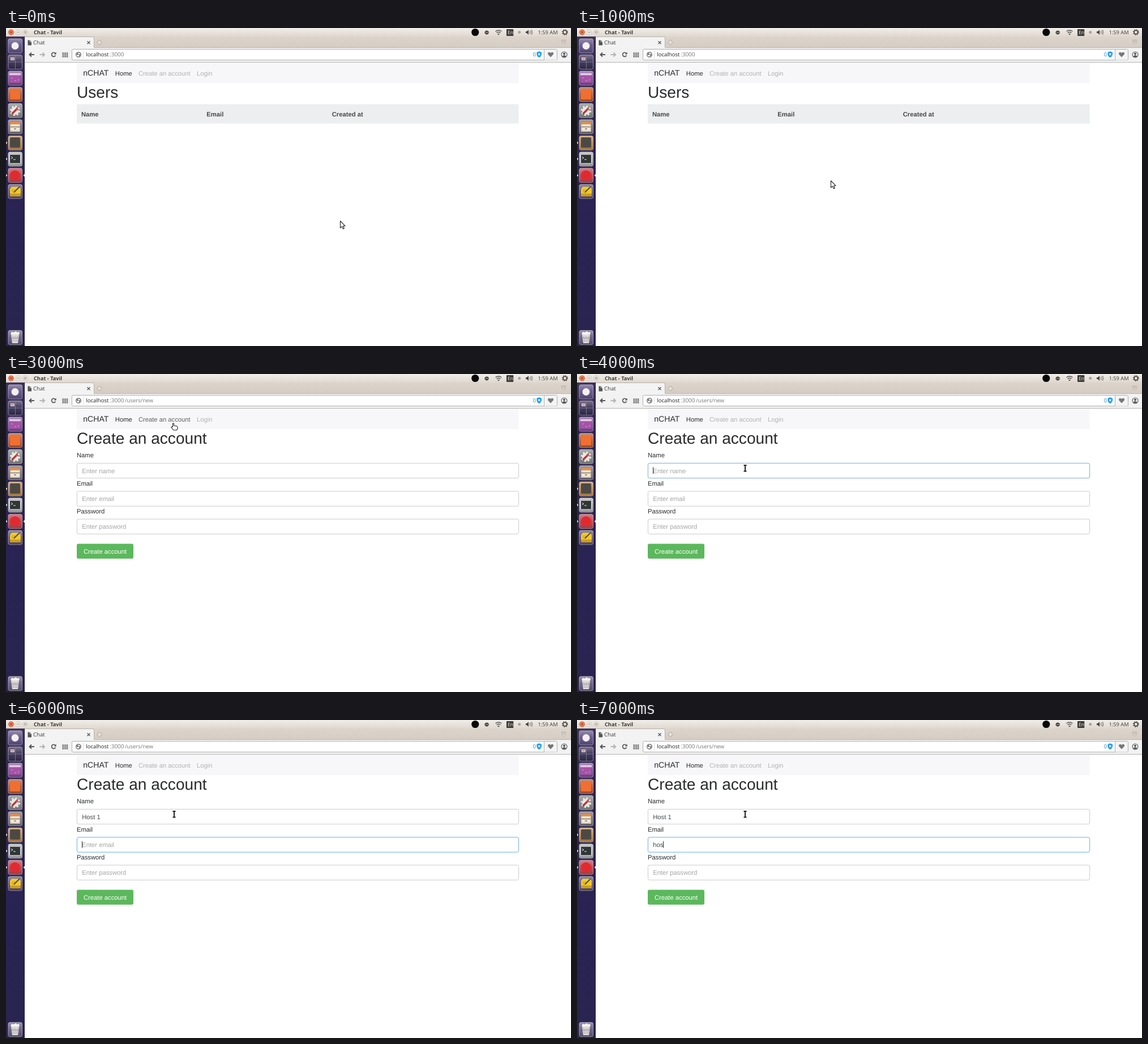
Write an HTML page that moves like this. It is 998 by 561 pixels and loops after 8000 ms.

```html
<!DOCTYPE html>
<html lang="en">
<head>
<meta charset="utf-8">
<title>Chat</title>
<style>
  html, body { margin: 0; width: 100%; height: 100%; overflow: hidden; background: #fff; }
  svg { display: block; }
  text { font: 11.24px "Liberation Sans", Arial, sans-serif; fill: #292b2c; white-space: pre; text-rendering: geometricPrecision; }
  .ui text, text.ui { font: 9.6px "Open Sans", "Noto Sans", sans-serif; fill: #3c3b37; }
  text.h1 { font-size: 28.1px; }
  text.brand { font-size: 14.05px; }
  .th text { font-weight: bold; fill: #464a4c; }
  .muted { fill: #b2b2b3; }
  .line { fill: none; stroke: #555; stroke-width: 1.3; }
  .field rect { fill: #fff; stroke: #ccc; }
  .hidden { display: none; }
</style>
</head>
<body>
<svg width="998" height="561" viewBox="0 0 998 561">
  <defs>
    <linearGradient id="panel" x2="0" y2="1"><stop stop-color="#f1ede8"/><stop offset="1" stop-color="#dfd8d0"/></linearGradient>
    <linearGradient id="tabs" x2="0" y2="1"><stop stop-color="#ddd5cc"/><stop offset="1" stop-color="#d5cdc4"/></linearGradient>
    <linearGradient id="dock" x2="0" y2="1"><stop stop-color="#40335c"/><stop offset=".15" stop-color="#30264f"/><stop offset=".6" stop-color="#292354"/><stop offset="1" stop-color="#2a2450"/></linearGradient>
    <linearGradient id="gloss" x2="0" y2="1"><stop stop-color="#fff" stop-opacity=".35"/><stop offset=".5" stop-color="#fff" stop-opacity=".08"/><stop offset="1" stop-opacity=".15"/></linearGradient>
    <g id="gear"><circle r="3.2" fill="none" stroke="#484640" stroke-width="1.6"/><circle r="4.6" fill="none" stroke="#484640" stroke-width="1.6" stroke-dasharray="1.8 1.81"/></g>
  </defs>
  <rect width="998" height="561" fill="#fff"/>

  <!-- system panel -->
  <g class="ui">
    <rect width="998" height="15" fill="url(#panel)"/>
    <circle cx="9" cy="7.5" r="4.8" fill="#ee7850" stroke="#c9694a" stroke-width=".7"/>
    <path d="M7.3 5.8l3.4 3.4m0-3.4l-3.4 3.4" stroke="#7a3b27"/>
    <g fill="#e9e4dd" stroke="#c8c1b8" stroke-width=".7"><circle cx="21.5" cy="7.5" r="4.6"/><circle cx="34" cy="7.5" r="4.6"/></g>
    <path d="M19.5 7.5h4M32.3 6h3.4v3h-3.4z" fill="none" stroke="#8b857c" stroke-width=".8"/>
    <text x="49" y="11" style="font-size:9.2px;font-weight:bold">Chat - Tavil</text>
    <circle cx="828.8" cy="7.5" r="6.6" fill="#080808"/>
    <path d="M845.5 9q-.5-4 3.5-4.5q4 0 4 4q-1 3-4 3q-2 0-3.500-2.500z" fill="#484640"/><path d="M847 8.500q3-2 5.500 0" stroke="#d8d1c9" fill="none" stroke-width=".8"/>
    <g class="line" stroke="#5c5953"><path d="M864.500 6q5.500-4 11 0M866.500 8.500q3.500-2.500 7 0"/></g><path d="M868 10.300q2-1.300 4 0l-2 2.400z" fill="#5c5953"/>
    <rect x="884" y="2" width="12.300" height="12" rx="1" fill="#3c3b37"/>
    <text x="886" y="11" style="font-size:8.600px;fill:#f3efea">En</text>
    <circle cx="906.800" cy="7.500" r="2.500" fill="#aaa49c"/>
    <path d="M918 6h2l3-3v9l-3-3h-2z" fill="#484640"/>
    <path d="M924.500 5.500q1.500 2 0 4M926.500 4q2.500 3.500 0 7M928.500 3q3 4.500 0 9" fill="none" stroke="#68645e" stroke-width=".9"/>
    <text x="939.500" y="11" style="font-size:9.300px">1:59 AM</text>
    <use href="#gear" x="987.300" y="7.500"/>
  </g>

  <!-- browser chrome -->
  <g class="ui">
    <rect x="33" y="15" width="965" height="19" fill="url(#tabs)"/>
    <rect x="33" y="34" width="965" height="26" fill="#f2f2f2"/>
    <path d="M33 34.500H998M33 60.500H998" stroke="#b7b3ae"/>
    <path d="M33 35V16h120q2.500 0 2.500 2.500V35z" fill="#f3f3f3"/><path d="M33 15.500h120q2.500 0 2.500 2.500v16.500" fill="none" stroke="#b9b2aa"/>
    <path d="M38.500 21.500h3.500l3 3v6h-6.500z" fill="#555"/><path d="M42 21.500v3h3" fill="none" stroke="#ddd" stroke-width=".7"/>
    <text x="48" y="29">Chat</text>
    <path d="M143.500 23.300l5 5m0-5l-5 5" class="line"/>
    <path d="M163.500 21.500h3v2.500h2.500v3h-2.500v2.500h-3v-2.500h-2.500v-3h2.500z" fill="#ebe6e0" stroke="#aaa39a" stroke-width=".7"/>
    <path d="M980.500 21.500h9M981.500 24.500h7l-3.500 4z" fill="#eee9e3" stroke="#a19a92" stroke-width=".8"/>
    <path d="M45 43.500l-3.500 3.500 3.500 3.500M42 47h8" class="line" style="stroke-width:2"/>
    <path d="M64.500 43.500l3.500 3.500-3.500 3.500M67.500 47h-8" class="line" style="stroke-width:2;stroke:#b5b5b5"/>
    <path d="M87.300 45a3.600 3.600 0 1 0 .2 3.300" class="line" style="stroke-width:1.700"/><path d="M88.700 42.500v4h-4z" fill="#555"/>
    <path d="M99.500 44.500h10M99.500 47.500h10M99.500 50.500h10" stroke="#555" stroke-width="2" stroke-dasharray="2.600 1"/>
    <rect x="116.500" y="37.500" width="857" height="19" rx="2" fill="#fff" stroke="#adadad"/>
    <path d="M950.500 38V56.500H971q2 0 2-2V40q0-2-2-2z" fill="#f4f4f4"/><path d="M950.500 38v18.500" stroke="#b0b0b0"/>
    <circle cx="128" cy="47" r="4.200" class="line"/><path d="M125 44.500l3 .5-.5 3-2-1zM129 46l2.500 1-2.500 3.500z" fill="#555"/>
    <path d="M136.500 40v14" stroke="#ddd"/>
    <text x="141.300" y="50.300" style="fill:#222">localhost</text>
    <text x="183" y="50.300" style="fill:#777;font-size:10px">:3000</text>
    <text id="path" x="210" y="50.300" style="fill:#777">/users/new</text>
    <text x="930.500" y="50.300" style="fill:#1c94dc">0</text>
    <path d="M937.500 42.500q2.500 0 4.300-1.500q2 1.500 4.200 1.500v4q-.5 3.500-4.200 5.500q-4-2-4.300-5.500z" fill="#1c9be4"/><path d="M940 44.500l3.600 3.600m0-3.600l-3.600 3.600" stroke="#fff" stroke-width="1.100"/>
    <path d="M962 51.500l-4.300-4.500q-1.500-2.500.5-4q2-1 3.800 1q2-2 4-1q2 1.500.3 4z" fill="#777"/>
    <circle cx="986" cy="47" r="5" class="line" style="stroke-width:1.100"/><circle cx="986" cy="45.500" r="2" fill="#555"/><path d="M982.300 50q3.700-4 7.400 0q-3.700 3-7.400 0z" fill="#555"/>
  </g>

  <!-- dock -->
  <rect y="15" width="33" height="546" fill="url(#dock)"/>
  <path d="M32.500 15v546" stroke="#1f1a3c"/>
  <g id="tiles"></g>
  <circle cx="16" cy="31.500" r="6.500" fill="#f4f0f2"/>
  <path d="M5 60h23M16.500 48v24" stroke="#8983a0" stroke-width=".8"/><rect x="8" y="52" width="7" height="5" fill="#d8cbd3"/><path d="M9 54.500h5" stroke="#a34d60"/>
  <path d="M6 79.500h20v4H6z" fill="#e5c9e5"/><path d="M6 83.500h20v13H6z" fill="#a653a8"/><path d="M9 88h3m3 5h3m3 0l2-3" stroke="#d6a1d7"/>
  <rect x="7" y="109" width="18" height="17" rx="1" fill="#f06f32"/>
  <circle cx="16" cy="146" r="7" fill="#e9e9e6"/><circle cx="16" cy="146" r="8" fill="none" stroke="#e9e9e6" stroke-width="2.500" stroke-dasharray="3.200 3.080"/><path d="M10.500 151.500l8-8" stroke="#bd3139" stroke-width="3.400"/><path d="M18 141l4 4m-1.500-4.500l-3 3" stroke="#c9464c" stroke-width="2"/>
  <rect x="7" y="166" width="18" height="17" rx="1" fill="#d5c8b5"/><path d="M7 174.500h18" stroke="#8b8174"/><path d="M7 166h18v4H7z" fill="#ed8b4a"/><path d="M9 170h14v3H9zM9 176h14v5H9z" fill="#f1eadf"/><path d="M14 178h4" stroke="#766d62" stroke-width="1.500"/>
  <rect x="7" y="193" width="18" height="18" rx="2" fill="#4c4945"/>
  <rect x="6.500" y="223" width="19" height="16" rx="1" fill="#303536" stroke="#f2f2ef"/><path d="M9 227l3 2-3 2M13 232h4" fill="none" stroke="#eee"/>
  <circle cx="16" cy="260" r="9" fill="#e12a30"/>
  <path d="M7 284l3-4h14l2 4v12H7z" fill="#f2c928"/><path d="M7 292h19v5H7z" fill="#cf9d19"/><path d="M10 286h9M10 289h6" stroke="#a07d25" stroke-width=".8"/><path d="M14 290l10-10" stroke="#574c3b" stroke-width="2"/>
  <path d="M9 540h14l-2 16H11z" fill="#e3e1df"/><path d="M8 540l2-4 4 1 3-2 3 2 3-1 1 4z" fill="#f7f7f5"/><path d="M12 543l1 11m3-11v11m4-11l-1 11M10 547h12" stroke="#908b94" stroke-width=".9"/>
  <path d="M0 200l2.500 2.500L0 205zM0 228.500l2.500 2.500L0 233.500zM0 257.500l2.500 2.500L0 262.500zM33 257.500l-2.500 2.500 2.500 2.500z" fill="#dcd9e2"/>

  <!-- page -->
  <rect x="125" y="61" width="780.500" height="36.500" fill="#f7f7f9"/>
  <text class="brand" x="136.300" y="84">nCHAT</text>
  <text x="192.800" y="84">Home</text>
  <text id="signup" x="233.900" y="84">Create an account</text>
  <text class="muted" style="fill:#b2b2b3" x="337" y="84">Login</text>
  <g id="list">
    <text class="h1" x="125" y="122.700">Users</text>
    <rect x="125" y="134.500" width="780.500" height="34" fill="#eceeef"/>
    <g class="th"><text x="133" y="156">Name</text><text x="354.300" y="156">Email</text><text x="575.700" y="156">Created at</text></g>
  </g>
  <g id="form">
    <text class="h1" x="125" y="122.700">Create an account</text>
    <g id="fields"></g>
    <rect x="125" y="299.500" width="100" height="26.300" rx="2.800" fill="#5cb85c"/>
    <text x="137" y="316.700" style="fill:#fff">Create account</text>
  </g>
  <path id="caret" d="M0 0v12" stroke="#333"/>

  <g id="cursors" stroke-linejoin="round">
    <path d="M.5.500v12.200l2.800-2.600 2.100 4.400 2-1-2-4.200h3.800z" fill="#fff" stroke="#222" stroke-width="1.100"/>
    <path d="M3.500 7.500V1.500q1-1.500 2 0V5l5 1q1.500.5 1.500 2v2l-1.500 3h-5.500L1 8.500q-.5-2 2.500-1z" fill="#fff" stroke="#222" stroke-width="1.100"/>
    <path d="M.5 1h5M.5 11.500h5M3 1v10.500" fill="none" stroke="#222" stroke-width="2"/>
  </g>
</svg>
<script>
const $ = id => document.getElementById(id);
const show = (el, on) => el.classList.toggle('hidden', !on);

const tileColors = ['#5b4c80', '#30284b', '#74478b', '#a9532f', '#80827f', '#6e6a70',
                    '#b98342', '#a5a6a5', '#b83f49', '#544a70', '#625779'];
$('tiles').innerHTML = tileColors.map((color, i) => {
  const y = i < 10 ? 19 + i * 28.55 : 533.5;
  return `<g stroke="#fff" stroke-opacity=".3" stroke-width=".8">
    <rect x="4" y="${y}" width="24.500" height="25" rx="3" fill="${color}"/>
    <rect x="4" y="${y}" width="24.500" height="25" rx="3" fill="url(#gloss)"/></g>`;
}).join('');

const fieldTops = [157.4, 206.9, 256];
$('fields').innerHTML = ['Name', 'Email', 'Password'].map((label, i) => {
  const y = fieldTops[i];
  return `<text x="125" y="${y - 10.3}">${label}</text>
    <g class="field"><rect x="125.400" y="${y}" width="780.200" height="26.300" rx="2.800"/>
    <text x="134.200" y="${y + 17.1}"></text></g>`;
}).join('');
const fields = [...document.querySelectorAll('.field')];
const prompts = ['Enter name', 'Enter email', 'Enter password'];

// One entry per second; cursor kinds: 0 arrow, 1 hand, 2 text beam
const steps = [
  { cursor: [0, 590, 340] },
  { cursor: [0, 448, 269] },
  { cursor: [0, 296, 92] },
  { cursor: [1, 291, 86], form: true, hover: true },
  { cursor: [2, 294, 160], form: true, focus: 0, values: [] },
  { cursor: [2, 294, 160], form: true, focus: 0, values: ['Hos'] },
  { cursor: [2, 294, 160], form: true, focus: 1, values: ['Host 1'] },
  { cursor: [2, 294, 160], form: true, focus: 1, values: ['Host 1', 'hos'] }
];

function render({ cursor: [kind, x, y], form = false, hover, focus = -1, values = [] }) {
  show($('list'), !form);
  show($('form'), form);
  show($('path'), form);
  $('signup').style.fill = hover ? '#606061' : '#b2b2b3';
  fields.forEach((field, i) => {
    const [box, text] = field.children;
    box.style.stroke = i === focus ? (i ? '#66afe9' : '#7facd0') : '#ccc';
    text.textContent = values[i] || prompts[i];
    text.style.fill = values[i] ? '#464a4c' : '#a5a5a5';
  });
  show($('caret'), focus >= 0);
  if (focus >= 0) {
    const typed = values[focus] ? fields[focus].lastElementChild.getComputedTextLength() : 0;
    $('caret').setAttribute('transform', `translate(${Math.floor(134.2 + typed) + 0.5} ${fieldTops[focus] + 6.8})`);
  }
  [...$('cursors').children].forEach((shape, i) => show(shape, i === kind));
  $('cursors').setAttribute('transform', `translate(${x} ${y})`);
}

let current = -1;
function tick() {
  const step = Math.floor(performance.now() % 8000 / 1000);
  if (step !== current) render(steps[current = step]);
  requestAnimationFrame(tick);
}
tick();
</script>
</body>
</html>
```
